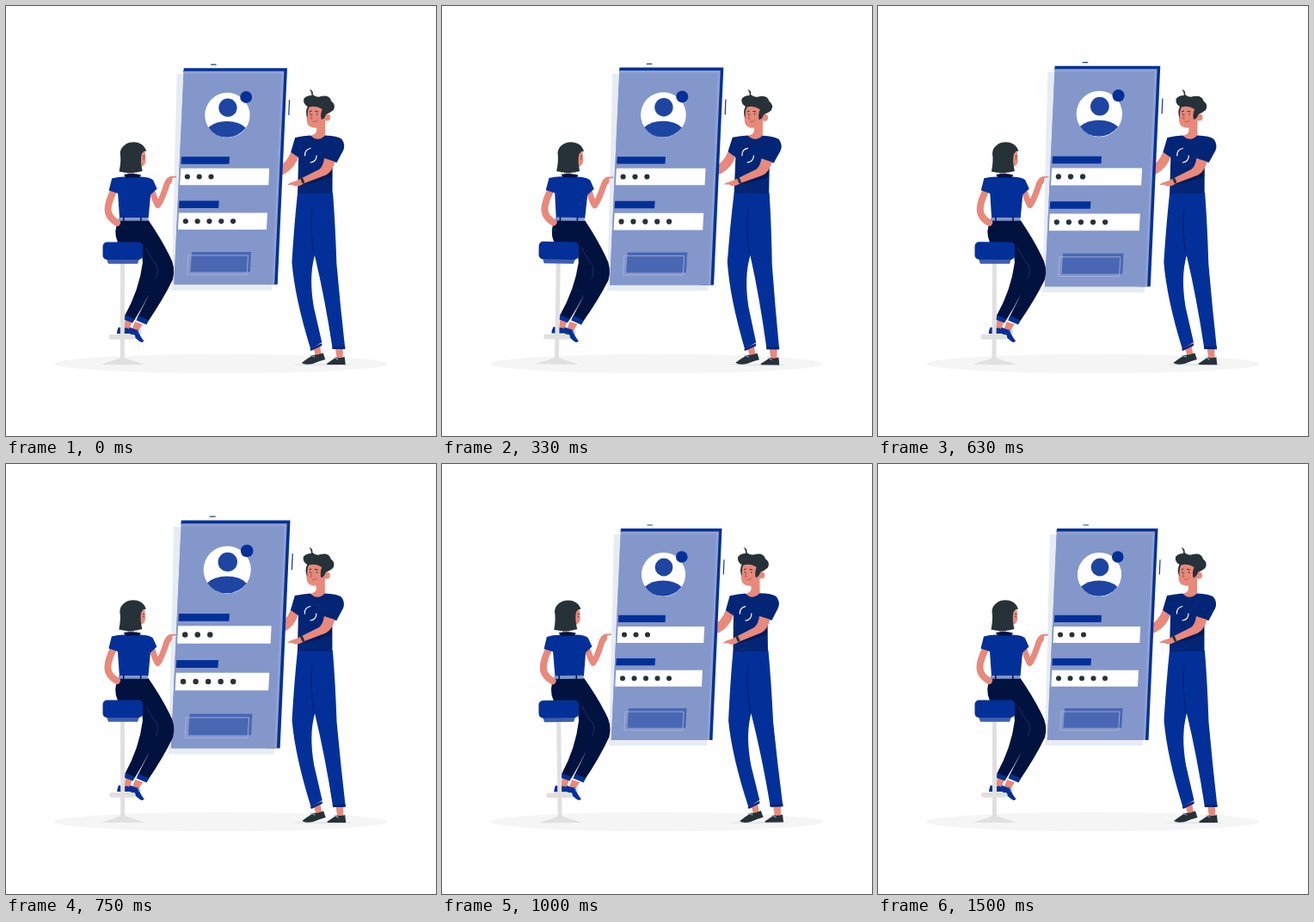
Recreate the animation shown at these times as an HTML page. Size 500x500 px, loop 1540 ms.

```html
<!DOCTYPE html>
<html lang="en">
<head>
<meta charset="utf-8">
<style>
  html, body { margin: 0; width: 100%; height: 100%; overflow: hidden; background: #fff; }
  svg { display: block; width: 100vw; height: 100vh; }
  .blue { fill: #033098; }
  .shirt { fill: #022576; }
  .navy { fill: #02123f; }
  .skin { fill: #e8897b; }
  .ink { fill: #263238; }
  .grey { fill: #e0e0e0; }
  .white { fill: #fff; }
  .line { fill: none; stroke-linecap: round; stroke-linejoin: round; }
  .limb { stroke: #e8897b; }
</style>
</head>
<body>
<svg viewBox="0 0 500 500">
  <ellipse cx="249.5" cy="416" rx="193.5" ry="11" fill="#f5f5f5"/>

  <g id="man">
    <ellipse cx="368" cy="417" rx="34" ry="1.2" fill="#e3e6ec"/>
    <path class="skin" d="M331 170L340 175Q336 188 324 195L314 199V189Q326 183 331 170Z"/>
    <path class="skin" d="M357 396L365 393 367 406H360ZM383 397H392L392 410H385Z"/>
    <path class="ink" d="M344 415Q349 411 357 406Q363 406 369 403.5L371.5 411Q364 413 357 416Q348 418 344 415ZM373 416Q379 412 384 408.5Q389 410 394 408L395 417H374Z"/>
    <path class="line" stroke="#9fb0d8" stroke-width="1" d="M354 406L359 408M382 408.500L386 411"/>
    <path class="blue" d="M339 217H380Q383 255 384.500 300Q389 350 394.500 398L380 399Q371 340 359 290Q352 315 358 350L367.500 391 354.500 399Q336 340 332.500 298Q335 255 339 217Z"/>
    <path class="line" stroke="#02257c" stroke-width="1.500" d="M356 235Q353 255 358 288"/>
    <path class="shirt" d="M353.500 399L367.500 392V395L355 401ZM379.500 396L394.500 395.500V399H380Z"/>
    <path class="skin" d="M361 137L371 133V150Q374 155 363 156Q354 155 354 151Q361 149 361 145Z"/>
    <path class="shirt" d="M336 153Q346 151 354 150.500Q362 159 371 150.500Q385 151 390 154.500Q395 161 392 168L384.500 182 379.500 181V218H339L340 176 331 170Z"/>
    <path fill="#021a58" d="M341 208L372 194 379 184V198Q358 207 341 208Z"/>
    <path class="line" stroke="#fff" stroke-width="1.200" d="M347.500 174Q347 167 354 165.500M354 182Q361 181 361 174"/>
    <path class="skin" d="M370 177L382.500 181Q379 193 372 196.500L347 206Q341 210 336 209.500L333 208 327 208Q329 205.500 338 203L364 190Q369 186 370 177Z"/>
    <path class="line" stroke="#263238" stroke-width="3" d="M343.500 200.500L345.500 205"/>
    <path class="skin" d="M351 115L349.500 128Q349 138 353 140Q358 143 364 141Q369 139 371 133V116Z"/>
    <circle class="skin" cx="373" cy="129.500" r="4"/>
    <path class="ink" d="M352.500 97Q357.500 98 356.500 103Q361 107 366 105Q376 103 378 110.500Q384 115 380.500 121Q377 124 372 126Q370 132 366.500 132Q365 126 367.500 120Q360 115 352.500 117.500Q350 121 350.500 131Q347 123 350.500 117Q345 114 346 108Q349 104 355 104Q355.500 100 352.500 97Z"/>
    <path class="line" stroke="#263238" stroke-width="1" d="M353 123L355 122M359.500 122.500L362.500 123M354 125.500V126.500M361.500 125.500V126.500"/>
    <path class="line" stroke="#a44f49" stroke-width=".8" d="M356 126L354 131H356M356.500 134.500Q360 135.500 362 132.500"/>
  </g>

  <g id="phone">
    <path fill="#e7ebf4" d="M200 82H319L308 327.500H194Z"/>
    <path class="blue" d="M208 75H325.500L314.500 321H300L207.500 79Z"/>
    <path fill="#91a2d0" d="M207.800 78.500H322L311 321H196.800Z"/>
    <path fill="#8497ca" d="M207.700 81.500H319L308.300 321H196.800Z"/>
    <path class="line" stroke="#1d3c92" stroke-width="1.200" d="M239 71H244.500M328 111.500L327.300 128"/>
    <circle class="white" cx="257.500" cy="128.500" r="25.600"/>
    <g fill="#1f45a3">
      <circle cx="258" cy="120" r="10.400"/>
      <path d="M236 142.500Q244 135.500 257 135.500Q271 135.500 278.500 143Q270 153.500 257 153.800Q243 153.500 236 142.500Z"/>
    </g>
    <circle class="blue" cx="278.800" cy="108" r="6.800"/>
    <path class="blue" d="M205.300 175.800H260L259.500 184H204.800ZM202.800 226H248L247.500 234.300H202.300Z"/>
    <path class="white" d="M204.500 189H305.200L304.300 208H203.500ZM202.300 239.700H303L302 258.700H201.300Z"/>
    <g id="dots" class="ink"></g>
    <path fill="#4a67b3" d="M217 284H284.500L283.300 306.800H215.500Z"/>
    <path fill="none" stroke="#a9b6db" stroke-width=".8" d="M213 288H281L279.700 309.700H212Z"/>
  </g>

  <g id="woman">
    <path class="skin" d="M139 364L147 367 143 377 137 375ZM150 367L159 370 154 378 147 375Z"/>
    <path class="blue" d="M131 373.500Q137 375 142 374.500L148 381H129Q129 377 131 373.500ZM144 373.500Q149 376 154 376.500Q155 383 160.500 389.500Q159 392 155.500 390L142 379Z"/>
    <path class="line" stroke="#b4c1e2" stroke-width="1" d="M153 377.500L157 377M154 380L157 379.500"/>
    <path class="navy" d="M131 249H165.500Q180 270 190 290Q198 304 194 318Q183 341 164.500 368L152.500 363Q165 340 174.500 316Q166 339 149.500 365L138 360.500Q155 330 159 298L157 280 130 275Q124 262 131 249Z"/>
    <path class="line" stroke="#263d77" stroke-width=".7" d="M163 282Q170 296 175 301Q178 308 174.500 316"/>
    <path class="blue" d="M139 359.500L150 364 147.500 368.500 137 364.500ZM154 360L166 365.500 163.500 370.500 151.500 365.500Z"/>

    <path class="line limb" stroke-width="8" d="M124.500 216Q116 234 119.500 242Q122 248 129 252"/>
    <path class="line limb" stroke-width="7" d="M170.500 217Q174 228 176.500 231.500Q181 226 187 207"/>
    <path class="skin" d="M183.500 207Q186 199 191 198L198 197.800V199.200L193 200.200Q194 205 190 208Z"/>
    <path class="skin" d="M141 189H149V199H141Z"/>
    <path class="blue" d="M123 200.500Q130 198.500 138 198.500H156Q168 199 171 202.500L175.500 212.500 168 219.500 165.500 247H132L130 218 119.500 214.500Z"/>
    <path class="navy" d="M137 196Q147 194 157 196.500L155 199.500H139Z"/>
    <path fill="#7f96cb" d="M131 246H165V249.800H131Z"/>
    <path class="navy" d="M136 245.500H137.500V250.500H136ZM156 245.500H157.500V250.500H156Z"/>
    <path class="skin" d="M154 170L161.500 169.500 162.300 180Q161 187 156 187Z"/>
    <path class="line" stroke="#263238" stroke-width=".8" d="M159.500 174.500L161 174.500M160 177V178"/>
    <path class="ink" d="M138 161.500C145 156 160 157 163 169Q160 168 157.500 172Q155.500 180 158.500 192Q146 196 131.500 192.500Q134 180 132.500 171Q133 165 138 161.500Z"/>

    <path class="grey" d="M133 299H138V409Q142 411 151 413.500L161 417H111L121 413.500Q130 411 133 409Z"/>
    <rect class="grey" x="120" y="382" width="30.500" height="5.800" rx="2.500"/>
    <path fill="#3f5eb0" d="M117 294H155L153 299.800H119Z"/>
    <rect class="blue" x="112.500" y="274.500" width="46.500" height="20.500" rx="5"/>
  </g>
</svg>
<script>
const el = id => document.getElementById(id);
const row = (x, y, n) => Array.from({ length: n }, (_, i) =>
  `<circle cx="${x + i * 13.5}" cy="${y}" r="3"/>`).join('');
el('dots').innerHTML = row(212, 198.5, 3) + row(210, 249.2, 5);

// Linear interpolation through [phase, value] stops
function track(p, stops) {
  const i = Math.max(1, stops.findIndex(s => s[0] >= p));
  const [a, u] = stops[i - 1], [b, v] = stops[i];
  return u + (v - u) * (p - a) / (b - a);
}
const beat = [[0, 1], [.1, 1.1], [.3, 1], [.4, 1], [.5, 1.1], [.6, 1], [1, 1]];
const sway = [[0, 0], [.25, 1], [.75, -1], [1, 0]];

function draw() {
  const p = Math.min(1, performance.now() % 1540 / 1500 + .022);
  const angle = track(p, sway);
  el('phone').setAttribute('transform', `translate(261 199) scale(${track(p, beat)}) translate(-261 -199)`);
  el('man').setAttribute('transform', `rotate(${angle} 358 257)`);
  el('woman').setAttribute('transform', `rotate(${angle} 155 288)`);
  requestAnimationFrame(draw);
}
draw();
</script>
</body>
</html>
```
